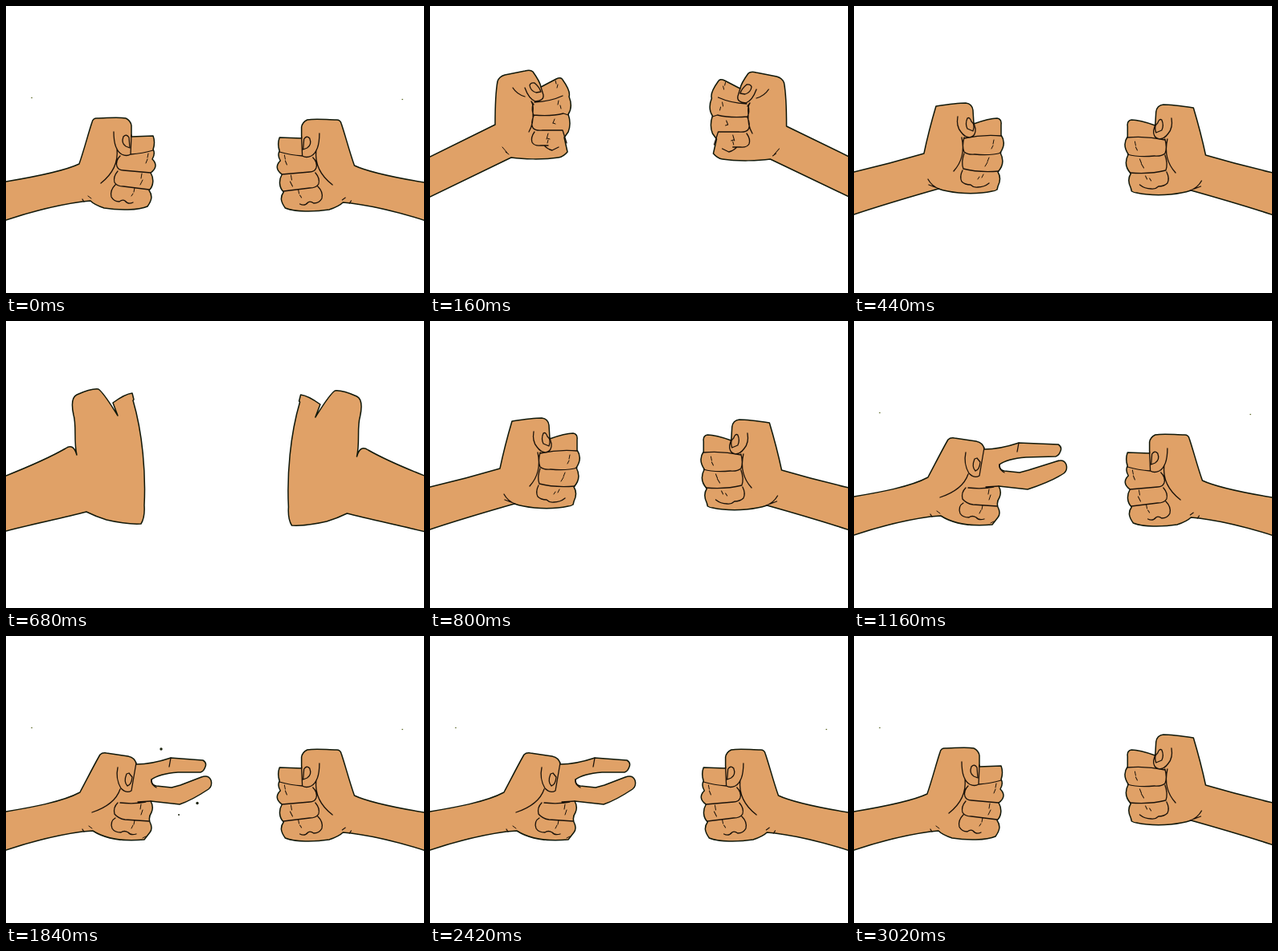
An HTML page that plays this animation: 520x358 px, repeating every 3100 ms.

```html
<!DOCTYPE html>
<html lang="en">
<head>
<meta charset="utf-8">
<title>Rock paper scissors</title>
<style>
html, body { margin: 0; width: 100%; height: 100%; overflow: hidden; background: #fff; }
svg { display: block; width: 520px; height: 358px; }
.skin { fill: #e0a167; stroke: #10180a; stroke-width: 1.5; stroke-linejoin: round; }
.ink { fill: none; stroke: #1a120a; stroke-width: 1.3; stroke-linecap: round; stroke-linejoin: round; }
.fine { stroke-width: 1; }
.nail { fill: #e0a167; }
.speck { fill: #55621c; }
.chip { fill: #1c2410; }
</style>
</head>
<body>
<svg viewBox="0 0 520 358">
  <g id="left"></g>
  <g id="right" transform="translate(525.5 2) scale(-1.012 1)"></g>
  <g id="chips"></g>
</svg>
<script>
// Each pose: outline, creases, fine marks, nail. Drawn for the left hand.
const poses = {
  rest: {
    skin: `M-12 221L0 219C30 214 70 207 91 197C97 180 102 160 107 145Q108 140 113 140
      C125 140 138 138 149 140Q155 143 156 149L156 163L183 162Q186 170 183 179Q186 184 182 191
      C188 197 187 203 180 208C184 215 184 224 178 230C183 237 181 243 176 250
      C165 255 140 255 122 252C113 249 108 246 105 243L95 244C65 248 30 257 0 267L-12 270Z`,
    ink: `M134 157C134 171 137 181 144 185Q150 188 155 185L156 161M138 178C140 197 132 210 118 221
      M155 185Q170 184 183 180M142 187Q136 193 138 200Q140 205 146 205L180 208
      M139 206Q133 213 135 220Q138 225 146 225L178 229
      M136 223Q129 230 131 238Q134 244 141 244Q145 241 148 243Q152 248 158 245M95 241l2 3`,
    fine: 'M177 184l-1 5M176 191l-2 5M169 209l-1 6M170 217l-3 6M160 227l-1 5M158 234l-2 3M102 237l4 3',
    nail: 'M146 163Q150 159 153 164L154 177L149 175Q143 171 146 163Z',
    speck: true
  },
  rise: {
    skin: `M-12 210L0 207C30 200 60 192 87 184C91 165 97 142 102 125C115 123 130 121 139 121
      Q147 122 148 130L149 147C160 143 170 140 178 140Q184 141 183 148L183 161
      Q190 171 182 183Q189 196 179 207Q184 215 179 225L178 229Q175 231 172 231
      C158 234 142 234 130 233C120 232 111 230 105 228C70 238 30 250 0 260L-12 264Z`,
    ink: `M129 138Q127 150 133 157Q138 164 144 164Q152 162 151 153L149 146
      M134 164C138 182 133 196 124 206M137 165Q160 160 183 162
      M137 164Q134 175 137 182Q142 186 150 185Q170 187 183 183M137 184Q133 195 136 203Q155 208 180 206
      M135 205Q131 213 134 219Q138 223 145 223Q149 227 154 226Q162 226 168 221
      M92 216Q97 225 106 228M93 223L106 228`,
    fine: 'M174 167l-1 5M173 174l-2 4M168 189l-2 5M166 195l-3 5M161 210l-2 4M156 213l-2 3',
    nail: 'M141 140Q138 147 141 153L148 156Q151 148 146 144Q144 138 141 140Z'
  },
  lift: {
    skin: `M-12 194L0 188L81 148C81 130 82 105 84 94Q86 88 93 86L118 81Q125 79 128 82
      C133 89 137 95 138 101L157 91Q163 88 165 92C170 99 175 107 173 113Q178 126 172 135
      Q176 147 172 157L167 164L171 182Q166 188 160 189C140 192 115 191 101 189
      L0 238L-12 244Z`,
    ink: `M103 102Q108 110 118 113M118 102Q123 116 131 119Q142 118 141 111L138 101
      M126 119Q129 124 128 132C129 145 126 152 123 157M130 120Q150 119 165 112
      M128 122Q126 131 129 136Q150 138 166 134L172 136M129 137Q125 146 128 152Q131 156 140 155L165 155L170 171
      M130 157Q125 164 127 170Q130 175 138 174L147 174M142 174Q147 179 152 180Q156 178 160 176M126 119l3 4`,
    fine: 'M156 93l1 4M159 98l-1 4M160 118l-1 5M162 124l1 4M155 141l-2 5M153 146l3 1M147 159l-2 7M146 165l3 1M147 167l-1 4M90 176l6 7M94 182l4 3',
    nail: 'M124 99Q125 95 130 96Q136 101 138 107L132 108Q125 106 124 99Z'
  },
  top: {
    skin: `M-12 195L0 189L80 151C77 130 77 110 79 93Q80 89 88 85C98 81 110 77 119 75
      Q121 75 123 80L131 99L150 85Q156 81 160 86C167 93 171 103 169 113Q177 123 174 128
      L170 135Q177 145 172 152L169 158Q174 170 173 178Q172 184 160 186
      C145 188 125 189 110 186C75 202 40 219 0 237L-12 243Z`,
    ink: `M110 102Q113 112 122 116Q134 118 136 112Q135 106 131 99M124 117C126 135 126 150 120 160
      M127 117Q145 114 160 107M126 118Q124 126 127 131Q145 132 171 125
      M127 132Q124 141 127 149Q145 151 172 152M128 151Q125 160 130 166Q137 168 142 167Q146 171 152 169M145 168Q147 176 152 178
      M106 184l4 2l3 -1M124 117l3 3`,
    fine: 'M157 89l-1 5M156 96l2 4M156 103l-2 4M153 113l1 4M155 119l-1 5M154 132l-2 4M154 137l1 4M152 153l2 4M153 159l-1 4',
    nail: 'M118 94Q115 100 121 104L127 104Q128 99 125 94Q121 91 118 94Z'
  },
  smear: {
    skin: `M-12 198L0 193C30 181 55 170 74 159Q84 152 88 167C84 150 88 130 84 117
      C81 103 82 95 88 92C97 88 107 84 115 85C122 90 130 104 139 118L133 102
      Q148 91 157 90L159 98L158 99C170 140 174 190 172 230Q173 245 168 253
      Q150 254 125 248Q112 244 100 238C70 246 30 254 0 262L-12 265Z`
  },
  snip: scissors(0, 0),
  reach: scissors(9, -1),
  sag: scissors(0, 2)
};

// dx lengthens both fingers, dy lowers their tips
function scissors(dx, dy) {
  const at = (x, y) => `${x + dx} ${y + dy}`;
  return {
    skin: `M-12 221L0 219C30 214 70 207 92 195C100 180 110 160 117 148Q120 145 125 146
      L152 150Q161 152 162 160C175 160 190 157 205 152L${at(245, 155)}Q${at(250, 158)} ${at(248, 163)}
      Q${at(246, 169)} ${at(242, 170)}L214 170Q190 172 181 179Q180 186 187 187L206 189L217 186
      L${at(243, 176)}Q${at(252, 173)} ${at(255, 180)}Q${at(257, 187)} ${at(252, 191)}
      C${at(240, 199)} 228 206 216 210L180 206Q184 213 181 220Q177 226 179 232Q183 240 179 245
      L172 254C150 256 125 254 108 243L95 244C65 248 30 257 0 267L-12 270Z`,
    ink: `M139 164Q136 178 143 190Q150 197 156 193L162 158M142 191C137 206 122 215 107 220
      M164 207L180 206M142 208Q160 210 174 207M139 208Q133 214 135 222Q140 228 148 229L178 231
      M136 227Q129 231 132 240Q135 245 143 245Q147 242 152 245Q155 249 162 247
      M205 152L203 163M181 179Q181 186 187 189M95 241l2 3`,
    fine: 'M168 210l-1 6M170 217l-2 6M160 230l-1 5M158 236l-2 4M103 237l4 3M170 252l4 -2',
    nail: 'M150 172Q146 182 151 187Q156 186 157 176L153 171Z',
    speck: true
  };
}

const pump = t => [[t, 'rest'], [t + 80, 'rise'], [t + 160, 'lift'], [t + 240, 'top']];

// start, left pose, right pose (same as left if missing), chip set
const steps = [
  ...pump(0), [320, 'smear'],
  ...pump(360), [680, 'smear'],
  ...pump(720), [1120, 'smear'],
  [1160, 'reach', 'rest'],
  [1840, 'snip', 'rest', 1],
  [2020, 'snip', 'rest', 2],
  [2160, 'sag', 'rest', 2],
  [2300, 'snip', 'rest'],
  [3020, 'rest', 'rise']
];
const loop = 3100;

const chips = {
  1: [[193, 141, 1.7], [238, 208.5, 1.7], [215, 223, 1]],
  2: [[188, 129, 1.9], [244, 217, 1.9], [218, 243, 1.3]]
};

const path = (cls, d) => d ? `<path class="${cls}" d="${d}"/>` : '';
const dot = (cls, [x, y, r]) => `<circle class="${cls}" cx="${x}" cy="${y}" r="${r}"/>`;

function hand(name) {
  const p = poses[name];
  return path('skin', p.skin) + path('ink', p.ink) + path('ink fine', p.fine) +
    path('ink nail', p.nail) + (p.speck ? dot('speck', [32, 114.5, 0.8]) : '');
}

const layer = id => document.getElementById(id);
const left = layer('left'), right = layer('right'), bits = layer('chips');
let shown;

function draw(now) {
  const t = now % loop;
  const step = steps.findLast(s => s[0] <= t);
  if (step === shown) return;
  shown = step;
  const [, l, r = l, set] = step;
  left.innerHTML = hand(l);
  right.innerHTML = hand(r);
  bits.innerHTML = (chips[set] || []).map(c => dot('chip', c)).join('');
}

const start = performance.now();
function tick() {
  draw(performance.now() - start);
  requestAnimationFrame(tick);
}
tick();
</script>
</body>
</html>
```
